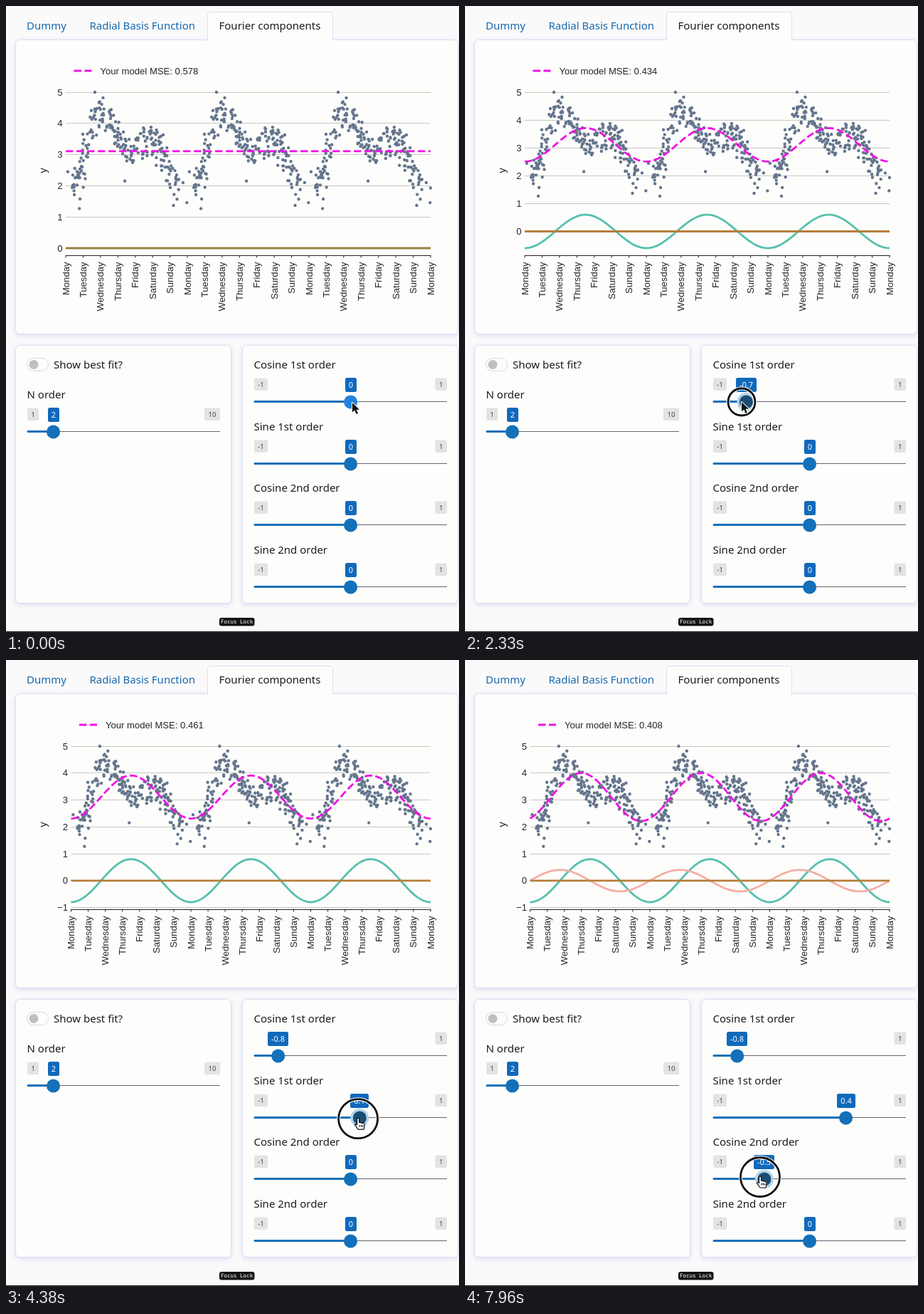
An HTML page that plays this animation: 637x879 px, repeating every 8 s.

```html
<!DOCTYPE html>
<html lang="en">
<head>
<meta charset="utf-8">
<title>Fourier components</title>
<style>
  html, body { margin: 0; width: 100%; height: 100%; overflow: hidden; background: #fafafb; }
  svg { display: block; width: 637px; height: 879px; }
  text { font: 15px "Noto Sans", "Open Sans", sans-serif; fill: #1c1c1e; }
  .link { fill: #1868ac; }
  .plot text { font: 13.1px "Liberation Sans", Arial, sans-serif; fill: #26262a; }
  .value { font-size: 11px; fill: #fff; text-anchor: middle; }
  .limit { font-size: 9.7px; fill: #444; text-anchor: middle; }
  .card { fill: #fdfdfc; stroke: #dcdeef; filter: drop-shadow(0 2px 3px #d9dcf4); }
</style>
</head>
<body>
<svg id="stage" viewBox="0 0 637 879"></svg>
<script>
const LOOP = 8000, RIGHT = 597, MEAN = 3.11, BLUE = '#1470b8', MAGENTA = '#f010e6';
const DAYS = ['Monday', 'Tuesday', 'Wednesday', 'Thursday', 'Friday', 'Saturday', 'Sunday'];
const stage = document.getElementById('stage');

function add(parent, tag, attrs = {}, text) {
  const node = document.createElementNS('http://www.w3.org/2000/svg', tag);
  set(node, attrs);
  if (text !== undefined) node.textContent = text;
  parent.append(node);
  return node;
}
function set(node, attrs) {
  for (const key in attrs) node.setAttribute(key, attrs[key]);
}
const label = (parent, x, y, text, attrs) => add(parent, 'text', { x, y, ...attrs }, text);
const box = (parent, x, y, width, height, rx, attrs) =>
  add(parent, 'rect', { x, y, width, height, rx, ...attrs });

// Tables of steps: rows start with a time in ms
const rowAt = (rows, t) => rows.findLast(row => row[0] <= t);
function tween(rows, t) {
  const i = rows.findLastIndex(row => row[0] <= t);
  const a = rows[i], b = rows[i + 1] || a;
  const k = b === a ? 0 : (t - a[0]) / (b[0] - a[0]);
  return a.slice(1).map((v, j) => v + (b[j + 1] - v) * k);
}

// time, cosine amplitude, sine amplitude, error
const FITS = [
  [0, 0, 0, '0.578'], [1600, -0.4, 0, '0.442'], [2100, -0.6, 0, '0.434'],
  [2850, -0.8, 0, '0.461'], [5700, -0.8, 0.4, '0.408']
];
const POINTER = [
  [0, 487, 557], [500, 486, 558], [1330, 440, 558], [2330, 389, 556], [2600, 384, 556],
  [2850, 384, 557], [3170, 496, 651], [3600, 486, 643], [4150, 486, 644], [5290, 531, 645],
  [5600, 532, 645], [6400, 486, 728], [6920, 485, 726], [7050, 485, 726], [7960, 415, 726]
];
const SHAPES = [[0, 'arrow'], [3060, 'beam'], [3300, 'hand']];
// Each drag: pressed from, to, step direction, times of each 0.1 step
const DRAGS = [
  { from: 450, to: 2720, dir: -1, steps: [620, 850, 1080, 1290, 1600, 1850, 2150, 2450] },
  { from: 4000, to: 5520, dir: 1, steps: [4350, 4560, 4790, 5050] },
  { from: 6700, to: LOOP, dir: -1, steps: [7180, 7330, 7490, 7660, 7850] }
];

// Page frame
add(stage, 'path', { d: 'M0 878.5H637', stroke: '#222' });
box(stage, 13.5, 47.5, 622, 413, 6, { class: 'card' });
box(stage, 13.5, 476.5, 303, 362, 6, { class: 'card' });
box(stage, 332.5, 476.5, 303, 362, 6, { class: 'card' });
add(stage, 'path', {
  d: 'M283.5 48.5V12.5q0-4 4-4H455.5q4 0 4 4V48.5', fill: '#fdfdfc', stroke: '#dcdeef'
});
label(stage, 29, 33, 'Dummy', { class: 'link' });
label(stage, 117.5, 33, 'Radial Basis Function', { class: 'link' });
label(stage, 299.5, 33, 'Fourier components');
box(stage, 29.5, 494.5, 30, 18, 9, { fill: '#fdfdfc', stroke: '#dadada' });
add(stage, 'circle', { cx: 39, cy: 503.5, r: 6.5, fill: '#bfbfbe' });
label(stage, 67, 508.5, 'Show best fit?');
box(stage, 300, 859, 49.5, 11.5, 3, { fill: '#151515' });
label(stage, 302, 867, 'Focus Lock', {
  style: 'font:7.5px "DejaVu Sans Mono",monospace;fill:#fff'
});

// Scatter: one noisy week, repeated. Band rows: day, low, high
const BAND = [
  [0.37, 1.55, 2.5], [0.78, 1.5, 2.9], [1.06, 1.7, 4], [1.31, 2.7, 4.3], [1.56, 3.3, 4.7],
  [1.8, 3.6, 4.9], [2.13, 3.8, 4.8], [2.62, 3.5, 4.7], [2.9, 3, 4.3], [3.3, 2.7, 3.8],
  [3.85, 2.6, 3.6], [4.5, 2.75, 3.9], [5.08, 2.75, 3.95], [5.5, 2.4, 3.8], [5.8, 2, 3.5],
  [6.1, 1.6, 3.1], [6.4, 1.5, 2.6], [6.65, 1.6, 2.2]
];
let seed = 11;
const random = () => (seed = (seed * 16807) % 2147483647) / 2147483647;
const week = [[0.12, 2.45], [0.78, 1.27], [1.68, 5], [2.15, 4.82], [3.4, 2.15], [6.2, 1.37],
  [6.75, 2.1], [6.97, 1.46]];
while (week.length < 245) {
  const day = 0.37 + random() * 6.2;
  if (day > 2.22 && day < 2.5 && random() < 0.7) continue;
  const [low, high] = tween(BAND, day);
  week.push([day, low + (high - low) * (0.75 * random() + 0.25 * random())]);
}

const plot = add(stage, 'g', { class: 'plot' });
function drawPlot(cosine, sine, error) {
  plot.replaceChildren();
  const left = cosine <= -0.8 ? 91.5 : 84;
  const unit = 219 / (5 - cosine);
  const px = day => left + day * (RIGHT - left) / 21;
  const py = value => 121 + (5 - value) * unit;
  const curve = (f, attrs) => {
    let d = 'M';
    for (let day = 0; day <= 21; day += 0.125)
      d += `${px(day).toFixed(1)} ${py(f(day * 2 * Math.PI / 7)).toFixed(1)} `;
    add(plot, 'path', { d, fill: 'none', 'stroke-width': 2.8, ...attrs });
  };

  for (let v = cosine <= -0.8 ? -1 : 0; v <= 5; v++) {
    const y = Math.floor(py(v)) + 0.5;
    add(plot, 'path', { d: `M${left} ${y}H${RIGHT}`, stroke: '#c8c8c2' });
    label(plot, left - 4.5, y + 4.5, v < 0 ? '\u22121' : v, { 'text-anchor': 'end' });
  }
  label(plot, 0, 0, 'y', {
    transform: 'translate(57 231) rotate(-90)', 'text-anchor': 'middle', style: 'font-size:15px'
  });

  let dots = '';
  for (let w = 0; w < 3; w++)
    for (const [day, v] of week) dots += `M${px(day + 7 * w).toFixed(1)} ${py(v).toFixed(1)}h0`;
  dots += `M${RIGHT} ${py(1.93)}h0`;
  add(plot, 'path', { d: dots, stroke: '#64758c', 'stroke-width': 4.4, 'stroke-linecap': 'round' });

  if (cosine) curve(a => cosine * Math.cos(a), { stroke: '#56c0ae' });
  if (sine) curve(a => sine * Math.sin(a), { stroke: '#f6aea6' });
  curve(() => 0, { stroke: cosine ? '#b77e3c' : '#968242' });
  const dashed = { stroke: MAGENTA, 'stroke-dasharray': '10.5 4.5' };
  curve(a => MEAN + cosine * Math.cos(a) + sine * Math.sin(a), dashed);

  add(plot, 'path', { d: `M${left + 11.5} 91h25`, 'stroke-width': 2.8, ...dashed });
  label(plot, left + 48.5, 95.5, 'Your model MSE: ' + error);

  let axis = `M${left} 350.5H${RIGHT + 0.5}`;
  for (let day = 0; day <= 21; day++) {
    axis += `M${px(day)} 350v3.5`;
    label(plot, 0, 0, DAYS[day % 7], {
      transform: `translate(${px(day) + 4.5} 359.5) rotate(-90)`, 'text-anchor': 'end'
    });
  }
  add(plot, 'path', { d: axis, stroke: '#222' });
}

function slider(x, y, name, min, max) {
  const g = add(stage, 'g');
  const limit = (cx, width, text) => {
    const part = add(g, 'g');
    box(part, cx - width / 2, y - 33.5, width, 17.5, 2, { fill: '#e3e3e5' });
    label(part, cx, y - 21, text, { class: 'limit' });
    return part;
  };
  label(g, x - 0.5, y - 47.5, name);
  const minWidth = min < 0 ? 19 : 16, maxWidth = max > 9 ? 22 : 16.5;
  const low = limit(x + minWidth / 2, minWidth, min);
  limit(x + 271 - maxWidth / 2, maxWidth, max);
  add(g, 'path', { d: `M${x} ${y - 0.5}h271`, stroke: '#66666c' });
  const fill = add(g, 'path', { stroke: BLUE, 'stroke-width': 3, 'stroke-linecap': 'round' });
  const halo = add(g, 'circle', { cy: y, r: 13, fill: '#b4d4ea' });
  const thumb = add(g, 'circle', { cy: y, r: 9.5 });
  const badge = box(g, 0, y - 34, 0, 20, 2.5, { fill: '#1169bb' });
  const value = label(g, 0, y - 20, '', { class: 'value' });

  return (v, state) => {
    const text = String(v);
    const cx = x + 8.2 + (v - min) / (max - min) * 254.8;
    const width = Math.round(10 + [...text].reduce((sum, c) => sum + (/\d/.test(c) ? 6.3 : 3.2), 0));
    const edge = Math.round(cx - width / 2);
    set(fill, { d: `M${x + 1} ${y - 0.5}H${cx}` });
    set(halo, { cx, visibility: state === 'pressed' ? 'visible' : 'hidden' });
    set(thumb, { cx, fill: { pressed: '#1b4c74', hover: '#2182da' }[state] || BLUE });
    set(badge, { x: edge, width });
    set(value, { x: edge + width / 2 });
    value.textContent = text;
    set(low, { visibility: edge < x + minWidth + 1 ? 'hidden' : 'visible' });
  };
}
slider(30, 598, 'N order', 1, 10)(2);
const sliders = ['Cosine 1st order', 'Sine 1st order', 'Cosine 2nd order', 'Sine 2nd order']
  .map((name, i) => slider(349, 556 + Math.round(i * 86.6), name, -1, 1));

// Pointer, with its hot spot at 0,0
const pointer = add(stage, 'g');
const ring = add(pointer, 'g', { fill: 'none' });
const ringEdges = [['#fff', 5], ['#111', 2.8]].map(([stroke, width]) =>
  add(ring, 'circle', { stroke, 'stroke-width': width }));
const outline = { 'stroke-linejoin': 'round', 'paint-order': 'stroke' };
const shapes = {
  arrow: add(pointer, 'path', {
    d: 'M0 0V13.5L3.2 10.6L5.6 16L8 15L5.6 9.7H10Z', fill: '#111', stroke: '#fff',
    'stroke-width': 2, ...outline
  }),
  beam: add(pointer, 'path', {
    d: 'M-.8-5H.8V3H3.5L0 7L-3.5 3H-.8Z', fill: '#111', stroke: '#fff', 'stroke-width': 2, ...outline
  }),
  hand: add(pointer, 'path', {
    d: 'M-1.5 0q1.5-2 3 0V5l6 1.5q2 .6 1.7 2.5L8 15H0L-4.5 8.5q.5-2 3 0ZM2 8.5v3M4.5 8.5v3M6.7 9v2.5',
    fill: '#fff', stroke: '#111', 'stroke-width': 1.2, 'stroke-linejoin': 'round'
  })
};

let shown;
function render(t) {
  const fit = rowAt(FITS, t);
  if (fit !== shown) {
    shown = fit;
    drawPlot(...fit.slice(1));
  }
  let held = false;
  sliders.forEach((update, i) => {
    const drag = DRAGS[i];
    if (!drag) return update(0);
    const pressed = t >= drag.from && t < drag.to;
    held ||= pressed;
    const hover = i === 0 && t < drag.from || i === 1 && t > 3400 && t < drag.from;
    const steps = drag.steps.filter(time => time <= t).length;
    update(steps ? drag.dir * steps / 10 : 0, pressed ? 'pressed' : hover && 'hover');
  });

  const [x, y] = tween(POINTER, t);
  const shape = rowAt(SHAPES, t)[1];
  set(pointer, { transform: `translate(${x} ${y})` });
  for (const name in shapes) set(shapes[name], { visibility: name === shape ? 'visible' : 'hidden' });
  set(ring, { visibility: held ? 'visible' : 'hidden' });
  for (const edge of ringEdges) set(edge, { r: shape === 'hand' ? 27.5 : 19 });
}

const start = performance.now();
function frame() {
  render((performance.now() - start) % LOOP);
  requestAnimationFrame(frame);
}
frame();
</script>
</body>
</html>
```
